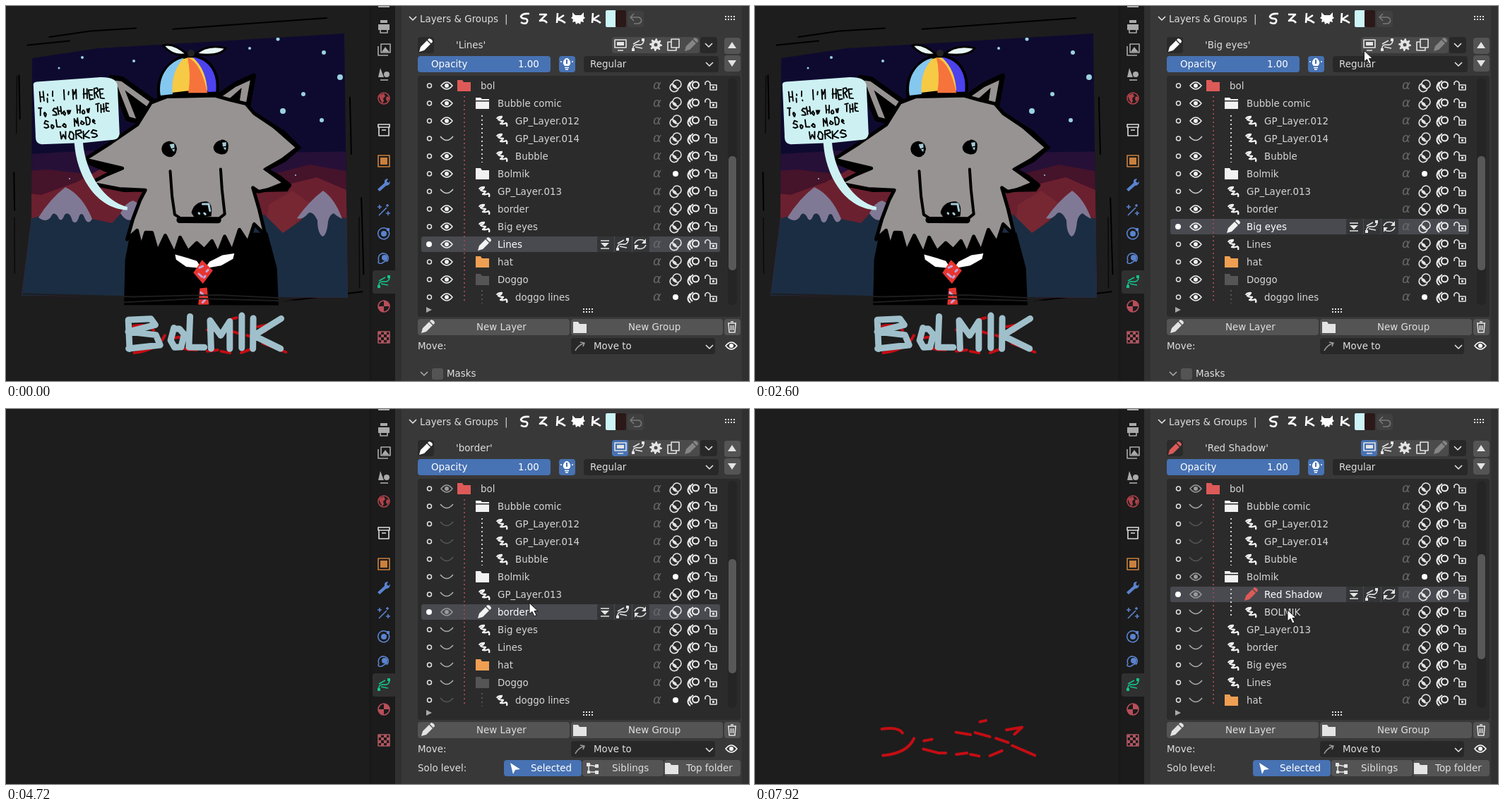
An HTML page that plays this animation: 1052 px wide and 532 px high, repeating every 8000 ms.

```html
<!DOCTYPE html>
<html lang="en">
<head>
<meta charset="utf-8">
<title>Layer solo mode</title>
<style>
html, body { margin: 0; width: 100%; height: 100%; overflow: hidden; background: #1d1d1d; }
svg { display: block; width: 1052px; height: 532px; }
text { font: 13.4px "DejaVu Sans", Verdana, sans-serif; fill: #dedede; white-space: pre; }
.ic path { fill: none; stroke: currentColor; stroke-width: 1.6; stroke-linejoin: round; }
.ic path.f { fill: currentColor; fill-rule: evenodd; stroke: none; }
.art path { stroke-linecap: round; stroke-linejoin: round; }
</style>
</head>
<body>
<svg viewBox="0 0 1052 532">
  <defs><clipPath id="pic"><path d="M37 74L130 60L300 50L479 39L481 200L484 414L300 412L22 411L36 300Z"/></clipPath></defs>
  <g id="art" class="art"></g>
  <g id="ui"></g>
  <g id="list"></g>
  <path id="cursor" d="M0 0V16L4 12.5L7 19L10 17.6L7 11.5H12Z" fill="#fff" stroke="#111"/>
</svg>
<script>
const LOOP = 8000, BLUE = '#4772b3', BTN = '#545454', DARK = '#282828';
const $ = id => document.getElementById(id);

// ---------- drawing helpers ----------
const rect = (x, y, w, h, fill, r = 4) => `<rect x="${x}" y="${y}" width="${w}" height="${h}" rx="${r}" fill="${fill}"/>`;
const label = (s, x, y, fill = '#dedede') => `<text x="${x}" y="${y + 5}" style="fill:${fill}">${s.replace('&', '&amp;')}</text>`;
const dot = (x, y, r, fill) => `<circle cx="${x}" cy="${y}" r="${r}" fill="${fill}"/>`;
const dots = (x, y1, y2, c) => `<path d="M${x} ${y1}V${y2}" stroke="${c}" stroke-width="2" stroke-dasharray="2 4"/>`;

const checker = [...Array(16).keys()].filter(i => (i + (i >> 2)) % 2 === 0)
  .map(i => `M${-8 + i % 4 * 4} ${-8 + (i >> 2) * 4}h4v4h-4z`).join('');
const cog = [...Array(32).keys()].map(i => {
  const r = i % 4 < 2 ? 9 : 6.3, a = i * Math.PI / 16;
  return (i ? 'L' : 'M') + (r * Math.cos(a)).toFixed(1) + ' ' + (r * Math.sin(a)).toFixed(1);
}).join('') + 'Z';

// "|" separates parts, "*" marks a filled part
const ICONS = {
  pencil: '*M-9 9L-7 2L2-7L7-2L-2 7ZM3-8L5-10Q10-9 10-5L8-3Z',
  folder: '*M-10-8H-3L-1-5H9V8H-10Z',
  folderOpen: '*M-10-8H-3L-1-6H9V-4H-10ZM-10-2.5H9V8H-10Z',
  strokes: 'M-7-3Q-6-6 0-6Q0-4-5-2Q-3 0 2 0Q1 2-2 4Q2 5 6 3Q8 4 7 8',
  eye: 'M-8 0Q0-10 8 0Q0 10-8 0Z|*M-3 0A3 3 0 0 1 3 0A3 3 0 0 1-3 0Z',
  shut: 'M-9-3Q0 8 9-3',
  mask: 'M-4-2A6 6 0 1 1 2 4A6 6 0 0 1-4-2|M-4-3A6 6 0 1 0 4 4|*M-4-2A6 6 0 0 0 2 4A6 6 0 0 0-4-2',
  onion: 'M-1-1A4.5 4.5 0 0 1 8-1A4.5 4.5 0 0 1-1-1|M0-7Q-9-1-1 6|M-4-5Q-11 3-4 8',
  lock: 'M-1-1H8V6H-1ZM-1-1V-4Q-5-9-8-4V-1|*M2 1H5V4H2Z',
  merge: '*M-6-2H6L0 4Z|M-6-5H6M-6 6H6',
  curve: 'M-7 7Q-8-1 0 0T8-7|M-4 3L6 5M-7-1L2-6|*M-9 5h4v4h-4zM5-9h4v4h-4z',
  refresh: 'M-8-1Q-5-8 4-6L7-3M8 1Q5 8-4 6L-7 3|*M8-8V-1H2ZM-8 8V1H-2Z',
  screen: 'M-8-7H8V4H-8ZM-4 8H4|*M-5-4H5V1H-5Z',
  gear: '*' + cog + 'M-2.5 0A2.5 2.5 0 0 1 2.5 0A2.5 2.5 0 0 1-2.5 0Z',
  copy: 'M-3-8H8V4H-3ZM-3-4H-8V8H4V4',
  down: 'M-5-2L0 3L5-2',
  triUp: '*M-6 4H6L0-5Z', triDown: '*M-6-4H6L0 5Z', play: '*M-4-4L4 0L-4 4Z',
  bulb: '*M-3 3Q-6 0-5-3Q-3-8 0-8Q3-8 5-3Q6 0 3 3ZM-1-6H1V0H-1Z|M-3 5.5H3M-2 8H2|M-9-3H-7M7-3H9',
  trash: 'M-6-5H6M-2-7H2M-5-5L-4 8H4L5-5M-1.5-2V5M1.5-2V5',
  arrowTo: 'M-7 6Q-4-1 6-5M0-6L6-5L4 0',
  undo: 'M-3-7L-8-2L-3 3M-8-2H4Q9 0 7 5L4 7H-3',
  pointer: '*M-6-8L8 1L1 2L-2 8Z',
  nodes: 'M-6-5V5H5M-6-5L5-3|*M-9-8h5v5h-5zM3 3h5v5h-5zM3-6h5v5h-5zM-8 3h4v4h-4z',
  grip: '*' + [-6, -2, 2, 6].map(x => `M${x}-3h2v2h-2zM${x} 1h2v2h-2z`).join(''),
  inkS: 'M6-7Q-4-8-6-3Q-5 0 1 0Q5 2 2 6Q-2 8-6 5', inkZ: 'M-5-6H5L-4 3Q3 1 6 6', inkK: 'M-4-8L-5 6M5-5L-4 1Q2 2 7 6',
  beast: '*M-8-9L-4-5L4-5L8-9L8-3L10-1L7 1L8 5L4 4L3 8L0 6L-3 8L-4 4L-8 5L-7 1L-10-1L-8-3Z',
  printer: '*M-8-3H8V5H-8ZM-5-9H5V-5H-5Z|M-5 4H5V9H-5Z',
  images: 'M-4-8H9V4H-4ZM-8-5V8H6|*M-3 3L2-4L5 0L8 3Z',
  scene: '*M-5-9L0 4H-8ZM4-4A4 4 0 0 1 4 4A4 4 0 0 1 4-4|M-5 8H6',
  globe: 'M-8 0A8 8 0 1 0 8 0A8 8 0 1 0-8 0|*M-7-4L0-7L2-3L-1 0L0 4L-2 7L-5 2ZM4-3L8-1L5 5L3 1Z',
  box: 'M-8-8H8V-4H-8ZM-7-4V8H7V-4M-3 0H3',
  square: '*M-5-5H5V5H-5Z|M-8-8H8V8H-8Z',
  wrench: '*M-9 6L1-3Q0-9 6-9L4-5L7-3L9-6Q9 1 3 1L-6 9Z',
  sparks: 'M-7 8L4-3M5-8V-4M3-6H7M-6-7V-1M-9-4H-3M6 2V8M3 5H9',
  orbit: 'M-8 2A8 8 0 1 1 3 7A8 8 0 0 1-8 2|*M-4 0A4 4 0 0 1 4 0A4 4 0 0 1-4 0M4-8h4v4h-4z',
  joint: 'M-7 4A7 7 0 1 1 4 6|M-7 4Q-10 9-3 8L5 3|*M-3 0A4 4 0 0 1 5 0A4 4 0 0 1-3 0',
  ball: 'M-8 0A8 8 0 1 0 8 0A8 8 0 1 0-8 0|*M0-8A8 8 0 0 1 8 0H0ZM0 8A8 8 0 0 1-8 0H0Z',
  check: '*' + checker + '|M-8-8H8V8H-8Z'
};
const icon = (name, x, y, color = '#e4e4e4', w = '') =>
  `<g class="ic" color="${color}" transform="translate(${x} ${y})">` +
  ICONS[name].split('|').map(p => p[0] === '*' ? `<path class="f" d="${p.slice(1)}"/>` : `<path d="${p}"${w && ` style="stroke-width:${w}"`}/>`).join('') + '</g>';

// ---------- fixed interface ----------
function buildUi() {
  const tabs = [['printer', 29], ['images', 62], ['scene', 97], ['globe', 131, '#b0424a'], ['box', 176, '#ddd'],
    ['square', 220, '#c9803e'], ['wrench', 254, '#5a83cf'], ['sparks', 289, '#5a83cf'], ['orbit', 323, '#5a83cf'],
    ['joint', 357, '#5a83cf'], ['curve', 391, '#12c48b'], ['ball', 426, '#b84e5a'], ['check', 470, '#b05560']];
  return rect(514, 0, 4, 532, '#191919', 0) + rect(518, 0, 33, 532, '#1b1b1b', 0) + rect(519, 375, 34, 33, '#303030') +
    rect(527, 0, 16, 2, '#aaa', 0) + tabs.map(([n, y, c = '#aaa']) => icon(n, 535, y, c)).join('') +
    rect(551, 0, 501, 532, '#303030', 0) + rect(560, -6, 482, 544, '#383838') +
    icon('down', 576, 17) + label('Layers & Groups', 586, 18) + label('|', 706, 18) +
    [['inkS', 735], ['inkZ', 760], ['inkK', 785], ['beast', 810], ['inkK', 835]].map(([n, x]) => icon(n, x, 18, '#fff', 2.6)).join('') +
    rect(849, 6, 15, 24, '#cdf4f7', 2) + rect(863, 6, 15, 24, '#2b1818', 2) +
    rect(880, 7, 23, 23, '#404040') + icon('undo', 892, 18, '#777') + icon('grip', 1024, 17) +
    rect(1017, 45, 23, 23, BTN) + icon('triUp', 1028, 56) + rect(1017, 70, 23, 23, BTN) + icon('triDown', 1028, 81) +
    rect(583, 71, 188, 23, BLUE) + label('Opacity', 602, 82, '#fff') + label('1.00', 725, 82, '#fff') +
    rect(783, 71, 23, 23, BLUE) + icon('bulb', 794, 82, '#fff') +
    rect(818, 71, 191, 23, DARK) + label('Regular', 827, 82) + icon('down', 996, 82) +
    rect(583, 99, 457, 342, '#2b2b2b') + rect(1022, 102, 13, 322, '#252525', 6) +
    icon('play', 599, 431, '#aaa') + icon('grip', 823, 432) +
    rect(583, 444, 215, 23, BTN) + icon('pencil', 597, 455) + label('New Layer', 666, 455) +
    rect(800, 444, 215, 23, BTN) + icon('folder', 813, 456) + label('New Group', 881, 455) +
    rect(1017, 444, 23, 23, BTN) + icon('trash', 1028, 455) +
    label('Move:', 583, 482) + rect(800, 471, 204, 23, DARK) + icon('arrowTo', 813, 483, '#999') +
    label('Move to', 832, 482) + icon('down', 996, 483) + icon('eye', 1027, 482, '#fff');
}

// ---------- layer list ----------
const ROOT = 'bol', GROUP = 'Bolmik', RED = '#dd5a58';
const KIDS = [['Red Shadow', 2, 'strokes', RED], ['BOLMIK', 2, 'strokes']];
const ROWS = [[ROOT, 0, 'folder', RED], ['Bubble comic', 1, 'folderOpen'], ['GP_Layer.012', 2, 'strokes'],
  ['GP_Layer.014', 2, 'strokes'], ['Bubble', 2, 'strokes'], [GROUP, 1, 'folder'], ['GP_Layer.013', 1, 'strokes'],
  ['border', 1, 'strokes'], ['Big eyes', 1, 'strokes'], ['Lines', 1, 'strokes'], ['hat', 1, 'folder', '#ee9f52'],
  ['Doggo', 1, 'folder', '#555'], ['doggo lines', 2, 'strokes']];
const STATES = [
  { at: 0, sel: 'Lines', show: 'all' },
  { at: 1500, sel: 'Big eyes', show: 'all' },
  { at: 3110, sel: 'Big eyes', show: 'eyes', solo: 1, masks: 1 },
  { at: 3150, sel: 'Big eyes', show: 'eyes', solo: 1 },
  { at: 4250, sel: 'border', show: '', solo: 1 },
  { at: 5000, sel: 'GP_Layer.013', show: '', solo: 1 },
  { at: 5900, sel: GROUP, show: 'title', solo: 1 },
  { at: 6960, sel: GROUP, show: 'title', solo: 1, open: 1 },
  { at: 7400, sel: 'Red Shadow', show: 'red', solo: 1, open: 1 }
];

function eyeOf(name, level, s) {
  const kid = KIDS.some(k => k[0] === name);
  if (!s.solo) return /01[34]$/.test(name) ? ['shut', '#ccc'] : ['eye', '#f0f0f0'];
  const seen = name === ROOT || name === s.sel || (kid && s.sel === GROUP) || (name === GROUP && s.sel === 'Red Shadow');
  return seen ? ['eye', '#999'] : ['shut', level === 2 && !kid ? '#555' : '#aaa'];
}

function row([name, level, kind, color = '#f2f2f2'], i, s) {
  const y = 113 + 25 * i, on = name === s.sel, [eye, eyeColor] = eyeOf(name, level, s);
  const active = s.sel === GROUP ? 'GP_Layer.013' : s.sel;
  const shape = name === active ? 'pencil' : name === GROUP && s.open ? 'folderOpen' : kind;
  const iconX = [649, 675, 702][level] + (kind === 'strokes' && level === 1 ? 2 : 0);
  let out = '';
  if (on) out += rect(588, y - 11, 423, 22, '#484a50', 3) +
    [['merge', 848], ['curve', 873], ['refresh', 898]].map(([n, x]) => rect(x - 11, y - 11, 24, 22, '#343537', 2) + icon(n, x, y)).join('');
  out += on ? dot(599, y, 4, '#fff') : `<circle cx="599.5" cy="${y}" r="3" fill="none" stroke="#e4e4e4" stroke-width="1.5"/>`;
  out += icon(eye, 624, y, eyeColor) + icon(shape, iconX, y, color, 2.3) + label(name, [672, 696, 721][level], y, on ? '#fff' : '#d6d6d6');
  out += `<text x="916" y="${y + 5}" style="font-size:18px;font-style:italic;fill:#686868">α</text>`;
  out += name === GROUP || name === 'doggo lines' ? dot(948, y, 4, '#fff') : icon('mask', 948, y);
  return out + icon('onion', 973, y, '#f0f0f0', 2) + icon('lock', 998, y);
}

function buildList(s) {
  const rows = s.open ? [...ROWS.slice(0, 6), ...KIDS, ...ROWS.slice(6, 11)] : ROWS;
  const tools = [['screen', 870], ['curve', 895], ['gear', 920], ['copy', 945], ['pencil', 970], ['down', 995]];
  const masks = icon('down', 592, 521, '#aaa') + rect(603, 514, 16, 16, BTN, 3) + label('Masks', 624, 521);
  const folderSel = s.sel === GROUP;
  let out = rect(583, 44, 23, 23, '#2a2a2a') +
    icon(folderSel ? 'folder' : 'pencil', 594, 56, s.sel === 'Red Shadow' ? RED : '#fff') + label(`'${s.sel}'`, 637, 55);
  out += rect(858, 44, 124, 23, '#4b4b4b') + rect(983, 44, 24, 23, DARK) + (s.solo ? rect(858, 44, 23, 23, BLUE) : '') +
    tools.map(([n, x]) => icon(n, x, 55, n === 'pencil' && !folderSel ? '#858585' : '#e4e4e4')).join('');
  out += rows.map((r, i) => row(r, i, s)).join('') + dots(649, 128, 422, '#9c4650') + dots(674, 155, 222, '#d0d0d0') +
    (s.open ? dots(674, 255, 297, '#d0d0d0') : dots(674, 403, 422, '#555'));
  out += s.open ? rect(1023, 206, 11, 149, '#585858', 5) : rect(1023, 213, 11, 162, '#585858', 5);
  if (!s.solo) return out + masks;
  return out + label('Solo level:', 583, 509) +
    rect(705, 498, 110, 23, BLUE) + icon('pointer', 720, 510, '#fff') + label('Selected', 743, 509, '#fff') +
    rect(816, 498, 115, 23, BTN) + icon('nodes', 831, 510) + label('Siblings', 858, 509) +
    rect(932, 498, 108, 23, BTN) + icon('folder', 943, 510) + label('Top folder', 963, 509) + (s.masks ? masks : '');
}

// ---------- hand-drawn picture ----------
let seed = 1;
const rnd = () => (seed = seed * 16807 % 2147483647) / 2147483647;
const wob = (d, a) => d.replace(/-?[\d.]+/g, n => (+n + (rnd() * 2 - 1) * a).toFixed(1));
const fill = (d, c, a = .6) => `<path d="${wob(d, a)}" fill="${c}"/>`;
const line = (d, w, c = '#000', a = .6) => `<path d="${wob(d, a)}" fill="none" stroke="${c}" stroke-width="${w}"/>`;
const both = (d, c, w, a = .6) => `<path d="${wob(d, a)}" fill="${c}" stroke="#000" stroke-width="${w}"/>`;

// strokes as xy digit pairs on a 6 by 9 grid
const GLYPHS = { H: '0009 6069 0565', I: '3039', '!': '3035 3839', "'": '3023', M: '0900356069', E: '60000969 0555',
  R: '0900506305 2569', T: '0060 3039', O: '20062959634020', S: '61200355683908', W: '0019345960', L: '000969',
  D: '00094966633000', K: '0009 600569', B: '0900405204556809',
  i: '3539 3233', o: '25072949573525', w: '0519354955', e: '07473515072949', m: '0905 05252729 25455559' };
function glyph(ch, x, y, sx, sy) {
  return (GLYPHS[ch] || '').split(' ').filter(Boolean)
    .map(s => 'M' + s.match(/\d\d/g).map(p => `${x + p[0] * sx} ${y + p[1] * sy}`).join('L')).join('');
}
function letters(str, x, y, sx, sy, step, turn) {
  const d = [...str].map((ch, i) => glyph(ch, x + i * step, y + i % 2 * sy, sx, sy)).join('');
  return `<g transform="rotate(${turn} ${x} ${y})">${line(d, 1.9, '#000', .7)}</g>`;
}

const STARS = [[352, 25, 2], [385, 47, 2.5], [450, 66, 3], [421, 125, 3], [392, 149, 4], [447, 162, 3], [473, 101, 4],
  [345, 60, 2], [108, 73, 2], [181, 78, 2], [75, 88, 1.5], [410, 240, 1], [90, 245, 1]];
const HEAD = 'M205 137L228 129L296 127L318 133L340 138L352 152L392 180L414 201L394 217L368 232L386 242L402 254L358 263L350 258' +
  'L358 288L367 325L352 310L343 336L331 317L320 348L310 327L300 352L291 333L281 346L270 336L258 348L246 328L238 352L225 325' +
  'L214 349L207 322L198 321L192 342L186 319L172 331L180 302L190 276L197 261L160 259L119 251L141 240L165 230L111 218L148 194L186 168Z';

const scenery = () => '<g clip-path="url(#pic)">' +
  rect(0, 0, 514, 425, '#0e0a2f', 0) +
  fill('M0 212L120 205L200 215L370 208L514 206V425H0Z', '#261038', 0) +
  fill('M0 236L60 232L130 240L200 228L380 238L430 225L514 240V425H0Z', '#45132a', 0) +
  fill('M0 262L50 268L100 250L140 228L190 260L380 258L440 243L514 275V425H0Z', '#6b202f', 0) +
  fill('M372 282L405 262L436 284L400 318L366 334Z', '#762732', 0) +
  fill('M0 312L48 298Q66 276 85 258Q106 270 122 302L150 308L180 276L210 310L366 296L392 322L418 304Q430 282 449 263Q466 280 475 300L514 308V425H0Z', '#1b2d42', 0) +
  fill('M46 300Q62 274 84 257Q108 268 122 302Q116 312 111 300Q108 292 104 297Q100 312 94 305Q90 290 83 296Q78 310 73 298Q67 290 63 300Q56 308 46 300Z', '#807995', 0) +
  fill('M412 301Q430 276 449 262Q466 274 476 302Q468 298 464 294Q458 296 456 306Q454 326 448 327Q441 322 441 304Q434 290 428 294Q420 304 412 301Z', '#807995', 0) +
  fill('M162 294Q170 278 180 276L196 285Q192 304 184 300Q172 310 162 294Z', '#807995', 0) +
  STARS.map(([x, y, r]) => dot(x, y, r, '#9bd2df')).join('') + '</g>';

const frameLines = () =>
  line('M62 44L120 36L184 31M236 33L350 25L454 17M18 98L20 160M11 236L12 290M30 55L90 50M503 272L506 380M487 130L489 210M395 419L505 405', 2) +
  line('M16 100L15 180M12 300L13 380M500 300L501 400M26 403L130 410', 1.5, '#0a0a0a');

const eyes = () => fill('M231 192Q242 193 242 203Q241 214 231 214Q220 212 220 203Q221 193 231 192Z', '#000') +
  fill('M305 190Q316 191 315 201Q314 211 305 211Q294 209 294 200Q296 191 305 190Z', '#000') +
  fill('M232 196L238 195L239 201L234 202ZM235 203L239 203L238 207ZM306 194L312 193L312 199L307 200ZM308 201L312 201L311 205Z', '#a3cbd7', .5) +
  line('M278 281L287 281L289 290M273 294L274 295M281 294L282 295', 3, '#a3cbd7', .5);

const redMarks = () => line('M180 454Q203 450 209 460M225 467Q216 488 181 492M238 482L257 487M239 471L251 469M259 488L270 488' +
  'M285 459L305 462M312 459L332 465M319 444L327 442M285 490L300 488M305 490L317 492M333 492L350 485M341 467L358 473' +
  'M356 455L378 451L367 462M364 478L396 491', 4, '#c30d13', .5);
const title = () => redMarks() + line(glyph('B', 174, 444, 7.5, 4.7) + glyph('O', 232, 457, 3.4, 3) + glyph('L', 260, 441, 3.6, 4.8) +
  glyph('M', 290, 447, 4.6, 4.3) + glyph('I', 319, 440, 5, 5) + glyph('K', 350, 443, 6.4, 4.8), 9, '#9fc0cb', 1.2);

const wolf = () =>
  fill('M176 322L168 360L167 424L386 424L384 372L370 322Z', '#000') +
  both('M149 101L165 104L213 139L196 166L172 160Z', '#979392', 7) + fill('M168 120L210 150L206 166L185 162Z', '#000') +
  both('M300 128L324 112L350 99L343 142L318 140Z', '#979392', 7) + fill('M310 137L334 116L330 136Z', '#000') +
  both(HEAD, '#979392', 5) +
  fill('M350 148L396 178L419 201L396 221L372 233L404 256L398 263L356 264L390 251L364 232L390 216L409 201Z', '#000') +
  fill('M109 217L165 231L118 251L195 263L166 264L114 254L146 237L112 223Z', '#000') +
  both('M217 129C212 97 235 72 262 71C290 74 302 95 299 123Q258 120 217 129Z', '#f6ca45', 5, .4) +
  fill('M219 127C214 98 232 78 252 74Q232 95 236 125Z', '#84c8f0', .4) +
  fill('M257 73Q276 80 285 123L258 123Q262 95 257 73Z', '#f6733c', .4) +
  fill('M264 73C288 76 300 95 297 122L285 122Q284 90 264 73Z', '#4c42ee', .4) +
  both('M256 68Q238 74 222 56Q236 51 256 68Z', '#e9f7f5', 3) + both('M268 68Q284 53 311 59Q302 72 268 68Z', '#e9f7f5', 3) +
  dot(262, 67, 5, '#222') +
  line('M232 234L235 270L239 296L246 301M304 231L306 260L310 295L302 301', 4) + line('M246 303L300 304', 9) +
  fill('M262 294Q265 278 284 277Q294 280 291 298L268 301Z', '#000') +
  eyes() +
  fill('M239 353L250 355L270 362L277 372L255 370L241 360ZM323 351L306 353L288 363L282 372L305 368L322 359Z', '#fff') +
  fill('M278 360L293 375L279 394L265 378ZM274 400L284 399L287 424L272 424Z', '#e8352f') +
  line('M274 371L278 369M284 376L286 374M273 380L277 384M281 385L282 383M276 406L280 410M282 417L278 420', 3, '#c3a3dc') +
  line('M24 409L180 413L300 410L386 414M165 420L270 415L420 419', 2, '#1d1d1d');

const bubble = () =>
  fill('M39 112Q38 108 44 107L134 101Q156 101 158 112L161 182Q160 190 150 190L109 194C112 234 136 277 172 285L172 290C130 288 100 245 97 195L50 196Q41 195 42 184Z', '#cdf1f3') +
  letters("Hi! I'M HERE", 48, 122, .85, 1.5, 7.7, -4) +
  letters('To SHow How THE', 46, 145, .75, 1.2, 6.8, -4) +
  letters('SoLo MoDe', 54, 163, .9, 1.2, 8.5, -6) +
  letters('WORKS', 77, 178, 1.3, 1.2, 11, -3);

const SCENES = { all: () => frameLines() + scenery() + wolf() + bubble() + title(), eyes, title, red: redMarks, '': () => '' };

// ---------- motion ----------
const MOVES = [[0, 716, 545], [700, 716, 545], [1200, 728, 311], [1600, 728, 311], [1870, 777, 258], [2300, 826, 130],
  [2700, 869, 51], [3600, 869, 51], [4180, 738, 288], [4450, 738, 288], [4720, 741, 275], [4950, 740, 262], [5450, 738, 262],
  [5800, 714, 238], [6300, 712, 238], [6840, 676, 239], [7020, 676, 239], [7300, 738, 263], [7600, 742, 264], [7920, 754, 285], [8000, 755, 287]];
function cursorAt(t) {
  const i = MOVES.findIndex(m => m[0] > t), [t0, x0, y0] = MOVES[i - 1], [t1, x1, y1] = MOVES[i];
  const k = (t - t0) / (t1 - t0), e = k * k * (3 - 2 * k);
  return [x0 + (x1 - x0) * e, y0 + (y1 - y0) * e];
}

let shownState, shownArt;
function frame() {
  const t = performance.now() % LOOP;
  const state = STATES.filter(s => s.at <= t).pop();
  const pose = Math.floor((t + 40) / 160) % 4, artKey = state.show + pose;
  if (state !== shownState) $('list').innerHTML = buildList(shownState = state);
  if (artKey !== shownArt) {
    seed = 977 + pose * 5413;
    $('art').innerHTML = SCENES[state.show]();
    shownArt = artKey;
  }
  $('cursor').setAttribute('transform', `translate(${cursorAt(t)})`);
  requestAnimationFrame(frame);
}
$('ui').innerHTML = buildUi();
frame();
</script>
</body>
</html>
```
